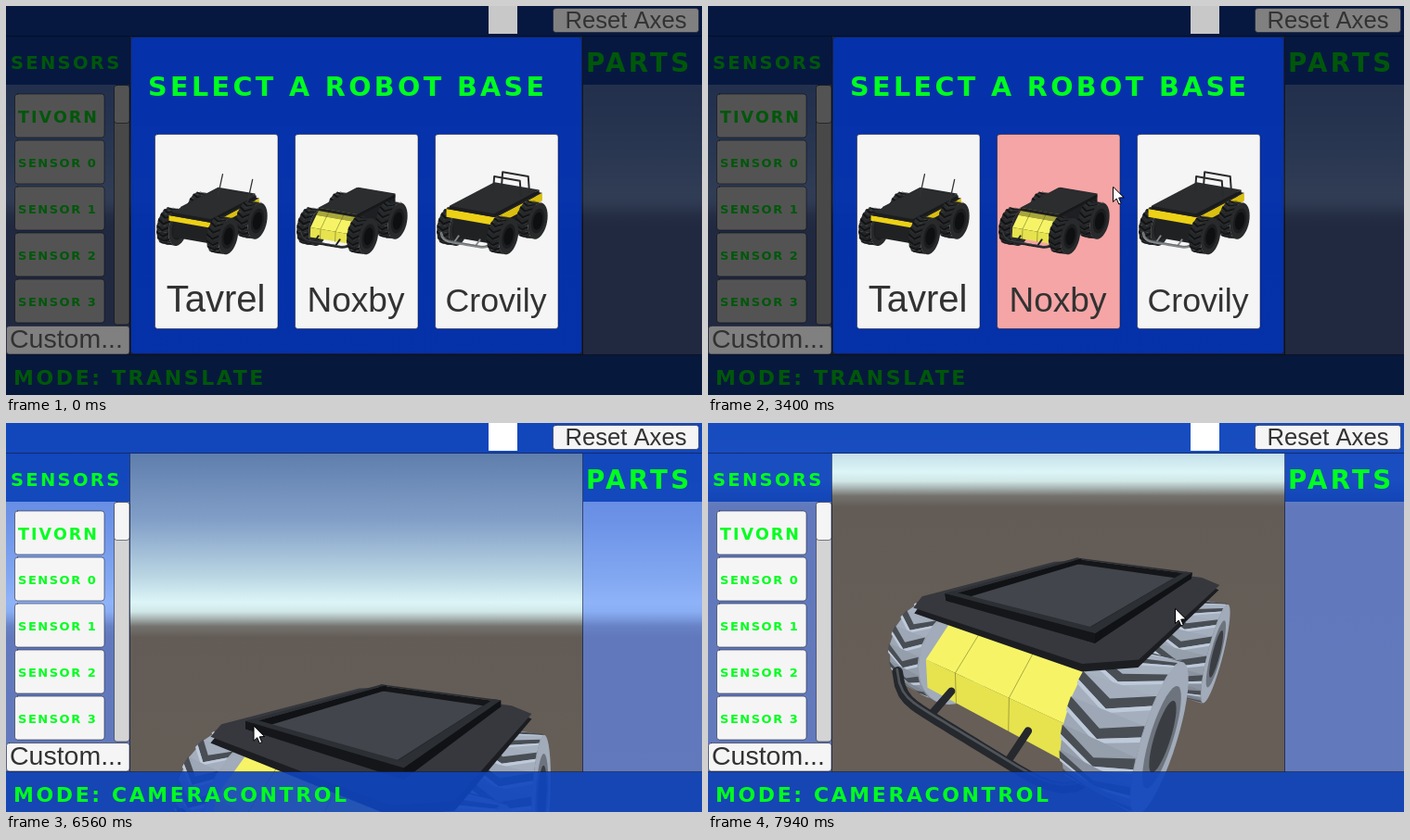
Write an HTML page with a canvas that moves like this. It is 750x420 px and loops after 8000 ms.

```html
<!DOCTYPE html>
<html lang="en">
<head>
<meta charset="utf-8">
<title>Robot builder</title>
<style>
html, body { margin: 0; width: 100%; height: 100%; overflow: hidden; background: #000; }
canvas { display: block; }
</style>
</head>
<body>
<canvas id="stage" width="750" height="420"></canvas>
<script>
const ctx = document.getElementById('stage').getContext('2d');
const LOOP = 8000, ENTER = 220, FOCUS = 1480, PRESS = 4180, SPAWN = 5000, CONTROL = 6100;
const FADE = 110;
const FOCAL = 210 / Math.tan(Math.PI / 6), RAD = Math.PI / 180;
const GREEN = '#00ff1e', INK = '#323232';

const clamp = v => Math.max(0, Math.min(1, v));
const mix = (a, b, k) => a.map((v, i) => v + (b[i] - v) * k);
const rgb = c => `rgb(${c.map(Math.round)})`;
const shade = (c, k) => rgb(c.map(v => Math.min(255, v * k)));

// Each move is [from, until, x, y]; the value rests between moves
function follow(start, moves, t) {
  return moves.reduce((at, [from, until, ...to]) => mix(at, to, clamp((t - from) / (until - from))), start);
}

const pointerAt = t => follow([528, 350], [
  [220, 780, 230, 227], [780, 1010, 287, 236], [1070, 1300, 362, 111],
  [1480, 1690, 268, 192], [1690, 2250, 481, 181],
  [2710, 3060, 272, 200], [3060, 3400, 436, 195], [3630, 4010, 500, 196],
  [5250, 5720, 386, 205], [5720, 6020, 136, 389],
  [6100, 6870, 354, 285], [6950, 7940, 503, 200]
], t);

// yaw and pitch in degrees
const LAST_YAW = 5.5;
const cameraAt = t => follow([10.9, -2.2], [[6100, 6870, 0, 0], [6950, 7940, LAST_YAW, 20.4]], t);

// ---- drawing helpers ----

function rect(x, y, w, h, fill) {
  ctx.fillStyle = fill;
  ctx.fillRect(x, y, w, h);
}

function button(x, y, w, h, fill = '#f5f5f5') {
  ctx.beginPath();
  ctx.roundRect(x, y, w, h, 3);
  ctx.fillStyle = fill;
  ctx.fill();
  ctx.strokeStyle = 'rgba(20,25,50,.55)';
  ctx.lineWidth = 1;
  ctx.stroke();
}

function label(s, x, y, size, align = 'left') {
  ctx.font = `${size}px "Liberation Sans", Arial, sans-serif`;
  ctx.textAlign = align;
  ctx.fillStyle = INK;
  ctx.fillText(s, x, y);
}

function wide(s, x, y, size) {
  ctx.font = `bold ${size}px "DejaVu Sans", sans-serif`;
  ctx.letterSpacing = size * .118 + 'px';
  ctx.textAlign = 'left';
  ctx.fillStyle = GREEN;
  ctx.fillText(s, x, y);
  ctx.letterSpacing = '0px';
}

function trace(pts) {
  ctx.beginPath();
  for (const p of pts) ctx.lineTo(...p);
}

function fill(color, pts) {
  trace(pts);
  ctx.fillStyle = color;
  ctx.fill();
}

function line(color, width, pts) {
  trace(pts);
  ctx.strokeStyle = color;
  ctx.lineWidth = width;
  ctx.lineJoin = ctx.lineCap = 'round';
  ctx.stroke();
}

// ---- vehicles: a runs to the rear, b to the near side, y up ----

function cameraView([yaw, pitch]) {
  const d = (LAST_YAW - yaw) * RAD, q = pitch * RAD;
  return (a, b, y) => {
    const x = .314 + .592 * a + .806 * b, z = 3.87 + .806 * a - .592 * b;
    const rx = x * Math.cos(d) + z * Math.sin(d);
    const rz = z * Math.cos(d) - x * Math.sin(d);
    const depth = rz * Math.cos(q) - y * Math.sin(q);
    const up = y * Math.cos(q) + rz * Math.sin(q);
    return [375 + rx / depth * FOCAL, 210 - up / depth * FOCAL];
  };
}

const cardView = cx => (a, b, y) => [cx + 18 * a + 23 * b, 211 - 9.5 * a + 4 * b - 32 * (y + 1.1)];

function box(view, a0, a1, b0, b1, y0, y1, top, front, side) {
  fill(front, [view(a0, b0, y0), view(a0, b1, y0), view(a0, b1, y1), view(a0, b0, y1)]);
  fill(side, [view(a0, b1, y0), view(a1, b1, y0), view(a1, b1, y1), view(a0, b1, y1)]);
  fill(top, [view(a0, b0, y1), view(a0, b1, y1), view(a1, b1, y1), view(a1, b0, y1)]);
}

function wheel(view, a, b, tire) {
  const r = .59, half = .28, count = 18, step = 2 * Math.PI / count;
  const at = (q, s, k = 1) => view(a + r * k * Math.cos(q), b + half * s, -1.77 + r * k * Math.sin(q));
  for (let i = 0; i < count; i++) {
    const q = i * step, n = q + step * 1.06;
    const quad = [at(q, -1), at(n, -1), at(n, 1), at(q, 1)];
    const [p, u, , v] = quad;
    if ((u[0] - p[0]) * (v[1] - p[1]) > (u[1] - p[1]) * (v[0] - p[0])) continue;
    fill(shade(tire, .95 + .2 * Math.sin(q)), quad);
    const lug = (from, to) => [
      at(q + step * from, -1, 1.02), at(q + step * (from + .6), 0, 1.02), at(q + step * from, 1, 1.02),
      at(q + step * to, 1, 1.02), at(q + step * (to + .6), 0, 1.02), at(q + step * to, -1, 1.02)
    ];
    fill(shade(tire, .5), lug(0, .35));
    fill(shade(tire, 1.3), lug(.35, .5));
  }
  for (const [k, tone] of [[1, 1.1], [.68, .75], [.48, .4]]) {
    fill(shade(tire, tone), Array.from({ length: 36 }, (_, i) => at(i * Math.PI / 18, 1, k)));
  }
}

function plate(view, y, color) {
  const [a0, a1, b, cut] = [-1.58, 1.44, 1.27, .28];
  fill(color, [
    [a0 + cut, -b], [a0, -b + cut], [a0, b - cut], [a0 + cut, b],
    [a1 - cut, b], [a1, b - cut], [a1, -b + cut], [a1 - cut, -b]
  ].map(([p, q]) => view(p, q, y)));
}

function nose(view) {
  const half = .87, profile = [[-1, -1.1], [-1.25, -1.3], [-1.6, -1.61], [-1.63, -1.93]];
  ['#a8a63a', '#f6f466', '#e6e34e'].forEach((c, i) => {
    const [[a, y], [a2, y2]] = profile.slice(i);
    fill(c, [view(a, -half, y), view(a, half, y), view(a2, half, y2), view(a2, -half, y2)]);
  });
  for (const b of [-.4, .3]) line('rgba(90,88,30,.6)', .8, profile.map(([a, y]) => view(a, b, y)));
  fill('#17181c', [...profile, [-.8, -1.93]].map(([a, y]) => view(a, half, y)));
}

function bumper(view, unit, color) {
  const tube = (lift, width, c) => line(c, width * unit, Array.from({ length: 25 }, (_, i) => {
    const b = i / 10 - 1.2, bend = Math.abs(b / 1.2) ** 8;
    return view(-1.85 + .1 * bend, b, -2 + .2 * bend + lift);
  }));
  for (const b of [-.5, .5]) line(color, unit * .08, [view(-1.6, b, -1.85), view(-1.85, b, -1.98)]);
  tube(0, .11, color);
  tube(.03, .025, '#50555c');
}

function rack(view) {
  const beam = (a0, a1, b0, b1) => box(view, a0, a1, b0, b1, -1.07, -.99, '#2c2f33', '#141619', '#101215');
  const [a, b, w] = [1.26, .9, .09];
  fill('#24262b', [view(-a, -b, -1.07), view(-a, b, -1.07), view(a, b, -1.07), view(a, -b, -1.07)]);
  fill('#42454c', [view(-a + .2, -b, -1.07), view(-a + .2, b - .2, -1.07), view(a, b - .2, -1.07), view(a, -b, -1.07)]);
  beam(a - w, a, -b, b);
  beam(-a, a, -b, -b + w);
  beam(-a, a, b - w, b);
  beam(-a, -a + w, -b, b);
}

function vehicle(view, unit, tire, style) {
  for (const a of [.65, -1.1]) wheel(view, a, -1.17, tire);
  box(view, -1, 1.25, -.87, .87, -1.93, -1.1, '#26282c', '#1d1f22', '#1d1f23');
  if (style.trim) {
    const { top, half, trim } = style;
    box(view, -1.4, 1.2, -.9, .9, -2, top, '#222', '#202123', '#1b1c1e');
    box(view, -1.5, 1.3, -half, half, top - trim, top, '#222426', '#ecd116', '#d9bf10');
    box(view, -1.45, 1.25, -half + .1, half - .1, top, top + .1, '#2b2d2f', '#1c1d1f', '#191a1c');
  } else nose(view);
  if (style.bumper) bumper(view, unit, style.bumper);
  for (const a of [.65, -1.1]) wheel(view, a, 1.17, tire);
  if (style.deck) {
    plate(view, -1.14, '#1b1d21');
    plate(view, -1.08, '#36383e');
    rack(view);
  } else if (!style.trim) {
    box(view, -1.1, 1.2, -.9, .9, -1.2, -1.1, '#2b2d2f', '#1d1e20', '#17181a');
  }
  if (style.masts) {
    for (const b of [-.6, .8]) line('#333', 1.3, [view(.9, b, style.top), view(.9, b + .22, style.top + .75)]);
  }
  if (style.cage) {
    for (const a of [.6, 1.1]) {
      line('#292b2d', 2, [view(a, -.6, -1), view(a, -.55, -.5), view(a, .65, -.5), view(a, .7, -1)]);
    }
  }
}

const CARDS = [
  { name: 'Tavrel', size: 40, style: { top: -1.25, half: 1.02, trim: .18, masts: true } },
  { name: 'Noxby', size: 37, style: { bumper: '#222426' } },
  { name: 'Crovily', size: 35.7, style: { top: -1.05, half: 1.15, trim: .27, cage: true, bumper: '#85888a' } }
].map((card, i) => ({ ...card, x: 160 + i * 151 }));

// ---- screen ----

function sky(pitch) {
  const h = 210 - FOCAL * Math.tan(pitch * RAD);
  const g = ctx.createLinearGradient(0, h - 200, 0, h + 200);
  const stops = [
    [-200, '#5776a6'], [-110, '#829fc8'], [-50, '#bad6e3'], [-22, '#dcf5f7'],
    [-12, '#d0e7e7'], [-4, '#a4b0af'], [4, '#74726e'], [16, '#635c56'], [200, '#665e57']
  ];
  for (const [d, c] of stops) g.addColorStop((d + 200) / 400, c);
  rect(0, 0, 750, 420, g);
}

function panels(t) {
  const bar = 'rgba(14,68,190,.94)', pane = 'rgba(95,140,250,.62)', edge = 'rgba(16,32,78,.7)';
  rect(0, 0, 750, 33, bar);
  for (const [x, w] of [[0, 133], [622, 128]]) {
    rect(x, 33, w, 52, bar);
    rect(x, 85, w, 292, pane);
  }
  rect(0, 377, 750, 43, 'rgba(14,68,190,.9)');
  for (const y of [32, 376]) rect(0, y, 750, 1, edge);
  for (const x of [133, 621]) rect(x, 33, 1, 344, edge);

  wide('SENSORS', 5, 68, 19.5);
  wide('PARTS', 625, 71, 27.7);
  ['TIVORN', 'SENSOR 0', 'SENSOR 1', 'SENSOR 2', 'SENSOR 3'].forEach((s, i) => {
    const y = 95 + i * 50;
    button(9.5, y, 96.5, 47);
    wide(s, 13, y + (i ? 29 : 31), i ? 13 : 17.5);
  });
  button(116.5, 85.5, 16.5, 258.5, '#d4d4d4');
  button(116.5, 85.5, 16.5, 41);
  wide('MODE: ' + (t < CONTROL ? 'TRANSLATE' : 'CAMERACONTROL'), 8, 409, 22);
}

function controls(face, swatch) {
  button(589.5, 2.5, 157, 26, face);
  label('Reset Axes', 668, 24, 25.6, 'center');
  button(.5, 345.5, 132.5, 30.5, face);
  label('Custom...', 4, 369, 28.5);
  rect(520, 0, 31, 30, swatch);
}

// Share of the last FADE ms that the pointer spent over a card
function glow(card, t) {
  const n = 22;
  let hits = 0;
  for (let i = 0; i < n; i++) {
    const at = t - i * FADE / n, [x, y] = pointerAt(at);
    if (at > FOCUS && x > card.x && x < card.x + 133 && y > 138 && y < 349) hits++;
  }
  return hits / n;
}

function chooser(t) {
  button(134.5, 33.5, 486, 342, 'rgba(4,50,176,.95)');
  wide('SELECT A ROBOT BASE', 153, 97, 28.6);
  for (const card of CARDS) {
    const lit = glow(card, t), pressed = lit * clamp((t - PRESS) / FADE);
    const color = mix(mix([245, 245, 245], [245, 165, 165], lit), [200, 188, 188], pressed);
    button(card.x + .5, 138.5, 132.5, 210, rgb(color));
    vehicle(cardView(card.x + 66), 25, [36, 38, 40], card.style);
    label(card.name, card.x + 66, 330, card.size, 'center');
  }
}

function pointer(x, y) {
  ctx.save();
  ctx.translate(x + .5, y + .5);
  trace([[0, 0], [0, 16], [3.7, 12.5], [6.3, 18.5], [8.7, 17.4], [6.2, 11.6], [11.3, 11.3]]);
  ctx.closePath();
  ctx.fillStyle = '#fff';
  ctx.fill();
  ctx.strokeStyle = '#000';
  ctx.lineWidth = 1;
  ctx.lineJoin = 'miter';
  ctx.stroke();
  ctx.restore();
}

function draw(t) {
  const camera = cameraAt(t), choosing = t < SPAWN;
  sky(camera[1]);
  if (!choosing) vehicle(cameraView(camera), 105, [146, 155, 168], { deck: true, bumper: '#25282d' });
  panels(t);
  if (choosing) {
    rect(0, 0, 750, 420, 'rgba(0,0,0,.66)');
    chooser(t);
  }
  controls(choosing ? '#808080' : '#f5f5f5', choosing ? '#c8c8c8' : '#fff');
  if (t >= ENTER) pointer(...pointerAt(t));
}

const start = performance.now();
function tick() {
  draw((performance.now() - start) % LOOP);
  requestAnimationFrame(tick);
}
tick();
</script>
</body>
</html>
```
